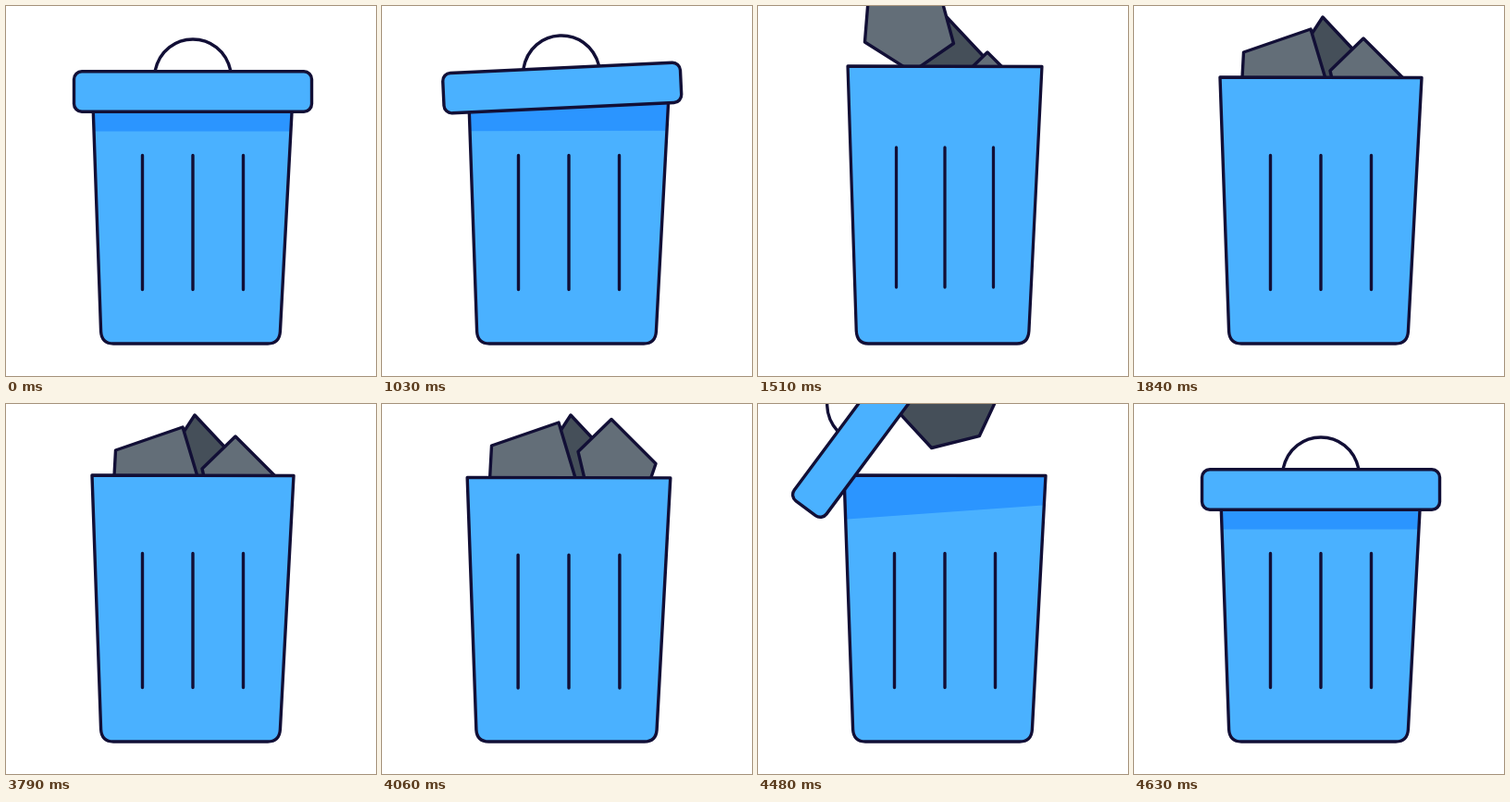
Recreate the animation shown at these times as an HTML page. Size 400 px wide and 400 px high, loop 4.66 s.

```html
<!DOCTYPE html>
<html lang="en">
<head>
<meta charset="utf-8">
<title>Bin</title>
<style>
  html, body { margin: 0; width: 100%; height: 100%; overflow: hidden; background: #fff; }
  svg { display: block; width: 100%; height: 100%; }
  .line { stroke: #120f36; stroke-width: 3.4; stroke-linejoin: round; stroke-linecap: round; }
  .blue { fill: #4ab1ff; }
  .shade { fill: #2b95ff; }
  .light { fill: #636e78; }
  .dark { fill: #454f59; }
  .none { fill: none; }
</style>
</head>
<body>
<svg viewBox="0 0 400 400">
  <defs>
    <path id="body" d="M93 77L102.6 352Q103.5 365 116 365H283Q295.500 365 296.400 352L311 77.500Z"/>
    <clipPath id="inside"><use href="#body"/></clipPath>
  </defs>
  <polygon id="dark" class="line dark" points="204,12 265,77 242,122 190,133 153,90"/>
  <polygon id="small" class="line light" points="248,35 296,83 280,130 225,125 212,70"/>
  <polygon id="big" class="line light" points="118.500,50 191,25 212,95 168,127 116,96"/>
  <g id="bin">
    <use href="#body" class="blue"/>
    <polygon id="shade" class="shade" clip-path="url(#inside)"/>
    <use href="#body" class="line none"/>
    <path class="line none" d="M147.500 161.500V306.500M202 161.500V306.500M256.500 161.500V306.500"/>
  </g>
  <g id="lid">
    <path class="line none" d="M-41 -22C-36 -45 -18 -56.500 0 -56.500S36 -45 41 -22"/>
    <rect class="line blue" x="-128.500" y="-21.700" width="257" height="43.400" rx="8.500"/>
  </g>
</svg>
<script>
const LOOP = 4660, STEP = 30, OPEN = 1000, SETTLED = 1840, CLOSE = 3790;
const GRAVITY = 0.0065;
const el = id => document.getElementById(id);

// Eased value between [time, value] stops.
function along(stops, t) {
  if (t <= stops[0][0]) return stops[0][1];
  for (let i = 1; i < stops.length; i++) {
    const [t0, v0] = stops[i - 1], [t1, v1] = stops[i];
    if (t < t1) return v0 + (v1 - v0) * (1 - Math.cos(Math.PI * (t - t0) / (t1 - t0))) / 2;
  }
  return stops[stops.length - 1][1];
}

const arc = (t, start, end) => GRAVITY * (t - start) * (end - t);

// Height above the resting place: a throw, then one small bounce.
function height(t, start, end) {
  if (t < end) return Math.max(-150, arc(t, start, end));
  return Math.max(0, arc(t, end, end + 56));
}

function placeRock(id, x, h, turn, cx, cy) {
  el(id).setAttribute('transform', `translate(${x} ${-h}) rotate(${turn} ${cx} ${cy})`);
}

const stretchStops = [[1220, 0], [1340, -0.27], [1510, 1], [1600, -0.6], [1710, 0.2], [1830, 0]];
const darkTurn = [[1210, -2], [1330, 0]];
const darkShift = [[1210, -4], [1330, 1], [1450, 0]];
const bigTurn = [[1510, 1.5], [1570, 0]];
const lidTurn = [[OPEN, 0], [1280, -96]];
const lidY = [[OPEN, 92.5], [1311, -83]];

function draw(t) {
  placeRock('dark', along(darkShift, t), height(t, 1087, 1360), along(darkTurn, t), 205, 85);
  placeRock('small', 0, height(t, 1528, 1638), 0, 250, 85);
  placeRock('big', 0, height(t, 1203, 1538), along(bigTurn, t), 160, 75);

  const k = along(stretchStops, t);
  el('bin').setAttribute('transform',
    `translate(202 365) scale(${1 - 0.037 * k} ${1 + 0.042 * k}) translate(-202 -365)`);

  const d = Math.max(0, t - OPEN);
  const lift = Math.pow(d / 210, 2.2);
  el('shade').setAttribute('points',
    `90,70 315,70 315,${135.5 - 55.5 * lift} 90,${135.5 - 22 * lift}`);

  const lidX = 202 - 229.5 * Math.pow(d / 330, 1.44);
  el('lid').setAttribute('transform',
    `translate(${lidX} ${along(lidY, t)}) rotate(${along(lidTurn, t)})`);
}

// Opening plays forward, closing plays the same motion backward.
function pose(t) {
  return t < CLOSE ? Math.min(t, SETTLED) : SETTLED + CLOSE - t;
}

const begin = performance.now();
function tick() {
  const t = (performance.now() - begin) % LOOP;
  draw(pose(Math.max(0, Math.floor((t - 10) / STEP) * STEP + 10)));
  requestAnimationFrame(tick);
}
tick();
</script>
</body>
</html>
```
